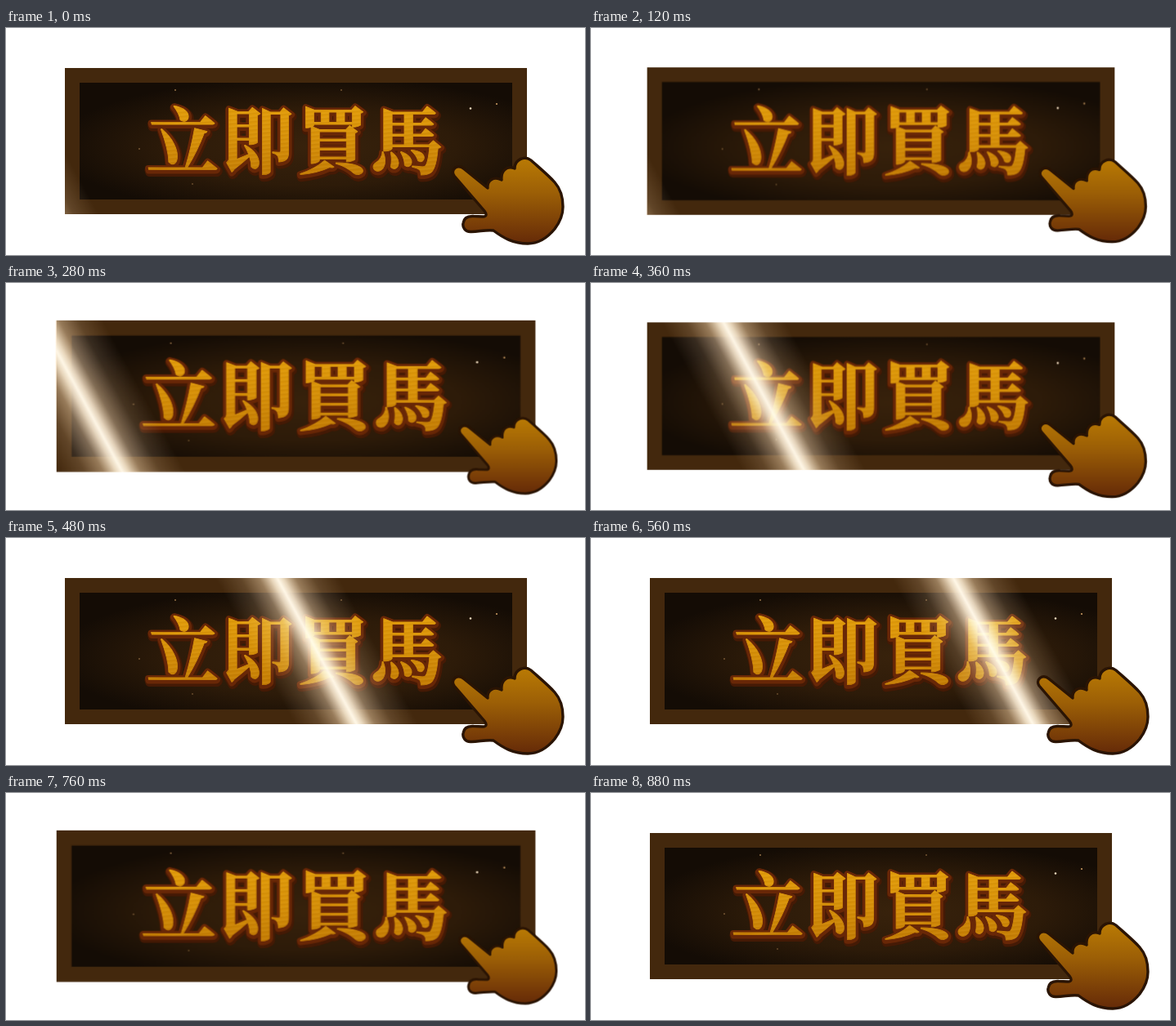
Write an HTML page that moves like this. It is 708 px wide and 278 px high and loops after 0.92 s.

```html
<!DOCTYPE html>
<html lang="zh-Hant">
<head>
<meta charset="utf-8">
<title>立即買馬</title>
<style>
html, body { margin: 0; width: 100%; height: 100%; overflow: hidden; background: #fff; }
svg { display: block; width: 708px; height: 278px; }

.button, .hand, .shine { animation: 920ms infinite; }
.button { --peak: 1.05; transform-origin: 354.5px 139px; animation-name: pulse; }
.hand { --peak: .84; transform-origin: 614px 211.5px; animation-name: pulse; }
.shine { mix-blend-mode: screen; animation-name: sweep; }

/* rests and peaks at 80, 240, 400, 560, 720 and 880 ms */
@keyframes pulse {
  0%, 8.6956%, 43.478%, 60.8695%, 95.652%, 100% { transform: scale(1); animation-timing-function: steps(4); }
  26.0869%, 78.2608% { transform: scale(var(--peak)); animation-timing-function: steps(4); }
}
/* runs from 200 to 760 ms */
@keyframes sweep {
  0%, 21.739% { transform: translateX(-10px); animation-timing-function: steps(14); }
  82.6086%, 100% { transform: translateX(771px); }
}

text {
  font: 900 89px "Noto Serif CJK TC", "Noto Sans CJK TC", "Noto Sans CJK", "Noto Sans CJK JP", serif;
  text-anchor: middle;
  stroke-linejoin: round;
}
</style>
</head>
<body>
<svg viewBox="0 0 708 278">
  <defs>
    <clipPath id="edge"><rect x="72" y="49.4" width="565" height="178.6"/></clipPath>
    <radialGradient id="panel" cx=".54" cy=".55" r=".6">
      <stop offset="0" stop-color="#38220c"/>
      <stop offset=".55" stop-color="#2d1b09"/>
      <stop offset="1" stop-color="#140c05"/>
    </radialGradient>
    <linearGradient id="gold" gradientUnits="userSpaceOnUse" x1="0" y1="96" x2="0" y2="182">
      <stop offset="0" stop-color="#e29c0a"/>
      <stop offset=".5" stop-color="#d68f08"/>
      <stop offset="1" stop-color="#c27a04"/>
    </linearGradient>
    <linearGradient id="brushed" gradientUnits="userSpaceOnUse" x1="0" y1="0" x2=".5" y2="5" spreadMethod="repeat">
      <stop offset="0" stop-color="#ffd25a" stop-opacity="0"/>
      <stop offset=".4" stop-color="#ffd25a" stop-opacity=".1"/>
      <stop offset=".7" stop-color="#8a5200" stop-opacity=".1"/>
      <stop offset="1" stop-color="#8a5200" stop-opacity="0"/>
    </linearGradient>
    <linearGradient id="glow">
      <stop offset="0" stop-color="#ffd8b0" stop-opacity="0"/>
      <stop offset=".2" stop-color="#ffd8b0" stop-opacity=".16"/>
      <stop offset=".35" stop-color="#ffdbb4" stop-opacity=".45"/>
      <stop offset=".45" stop-color="#ffecd2" stop-opacity=".88"/>
      <stop offset=".5" stop-color="#fff6e6"/>
      <stop offset=".55" stop-color="#ffecd2" stop-opacity=".88"/>
      <stop offset=".65" stop-color="#ffdbb4" stop-opacity=".45"/>
      <stop offset=".8" stop-color="#ffd8b0" stop-opacity=".16"/>
      <stop offset="1" stop-color="#ffd8b0" stop-opacity="0"/>
    </linearGradient>
    <linearGradient id="skin" gradientUnits="userSpaceOnUse" x1="0" y1="160" x2="0" y2="264">
      <stop offset="0" stop-color="#b97a04"/>
      <stop offset=".4" stop-color="#9c5f06"/>
      <stop offset="1" stop-color="#652a08"/>
    </linearGradient>
    <text id="label" x="216 308 399.5 490.5" y="171">立即買馬</text>
  </defs>

  <g class="button" clip-path="url(#edge)">
    <rect x="72" y="49" width="565" height="179" fill="#43280d"/>
    <rect x="90" y="67" width="529" height="143" fill="url(#panel)"/>
    <g fill="#c99a62">
      <circle cx="568" cy="98.5" r="1.3" fill="#f0dcc0"/>
      <circle cx="600" cy="93" r="1.1"/>
      <circle cx="207" cy="76" r="1" opacity=".7"/>
      <circle cx="410" cy="76" r="1" opacity=".5"/>
      <circle cx="163" cy="148" r="1" opacity=".5"/>
      <circle cx="228" cy="191" r="1" opacity=".4"/>
    </g>
    <use href="#label" x="1" y="3" fill="#451a05" stroke="#451a05" stroke-width="11"/>
    <use href="#label" y="1" fill="#682707" stroke="#682707" stroke-width="8"/>
    <use href="#label" fill="url(#gold)" stroke="url(#gold)" stroke-width=".8"/>
    <use href="#label" fill="url(#brushed)"/>
    <g class="shine">
      <rect x="-75" y="-95" width="150" height="190" transform="translate(0 139) skewX(28.5)" fill="url(#glow)"/>
    </g>
  </g>

  <g class="hand">
    <path fill="url(#skin)" stroke="#2a1404" stroke-width="3.4" stroke-linejoin="round" d="
      M549 171.5 C553 168.5 557 170 560 172.5 L589 196
      C588 187 596 181 606 186 C605 175 612 168 622 172
      C622 161 634 156 642 162 C652 171 664 181 671 189
      C679 198 681 208 681 219 C681 229 677 238 671 246
      C662 257 650 264 638 264 C620 264 608 257 596 248
      C588 247 580 249 569 249.5 C561 250 558 244 559 239
      C560 232 565 230 572 230.5 L583 231 C588 231 588 228 585 224
      L548 181 C546 178 546 174 549 171.5 Z"/>
  </g>
</svg>
</body>
</html>
```
